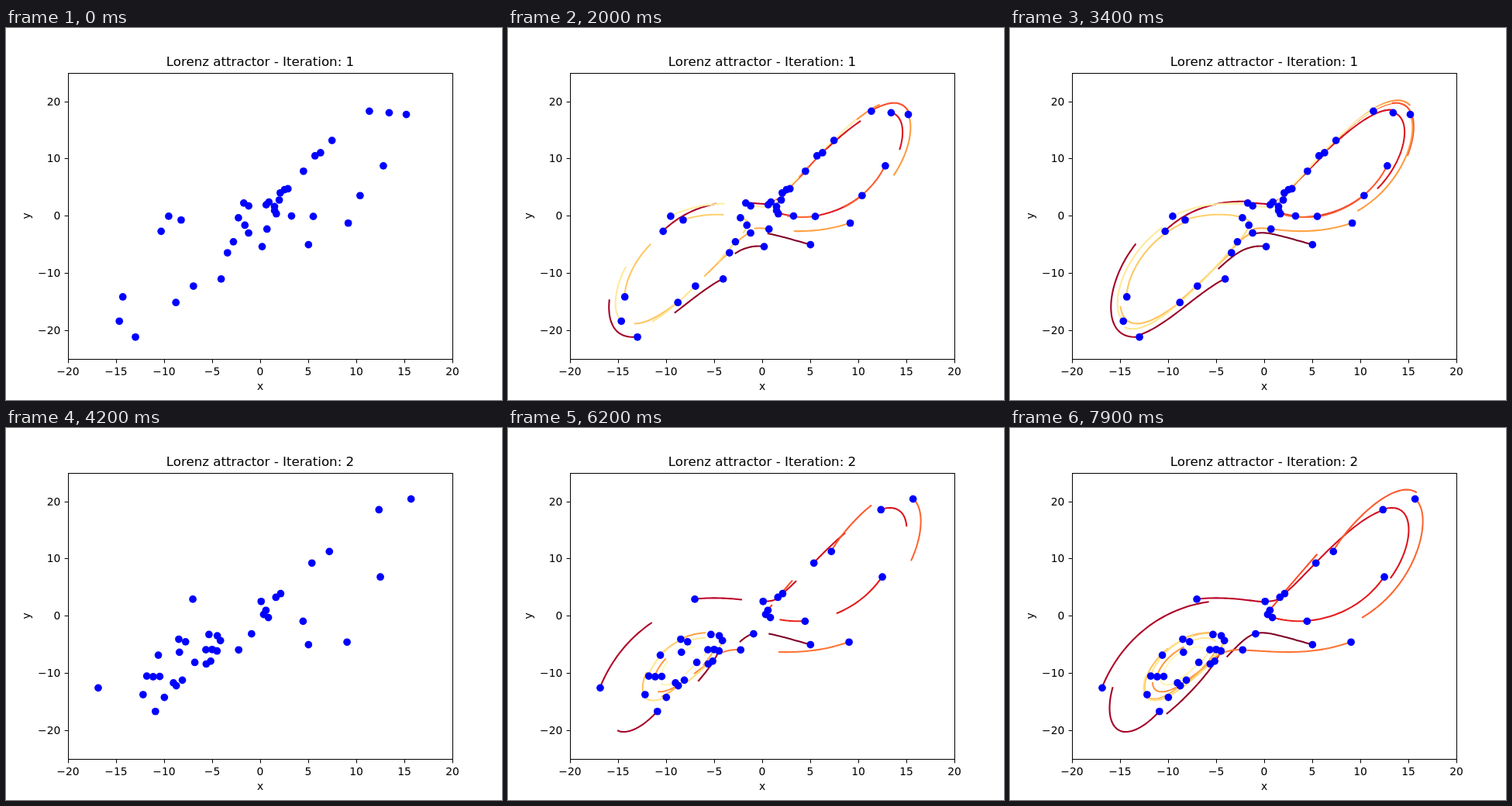
An HTML page with a canvas for the animation above (8000 ms loop, 640x480 px).

```html
<!DOCTYPE html>
<html lang="en">
<head>
<meta charset="utf-8">
<title>Lorenz attractor</title>
<style>
html, body { margin: 0; width: 100%; height: 100%; overflow: hidden; background: #fff; }
canvas { display: block; }
</style>
</head>
<body>
<canvas id="stage" width="640" height="480"></canvas>
<script>
const ctx = document.getElementById('stage').getContext('2d');
const COUNT = 40, SPAN = 0.125, STEPS = 36;
const FONT = '"DejaVu Sans", sans-serif';
const RAMP = ['800026', 'bd0026', 'e31a1c', 'fc4e2a', 'fd8d3c', 'feb24c', 'fed976', 'ffeda0', 'ffffcc']
  .map(hex => [0, 2, 4].map(i => parseInt(hex.slice(i, i + 2), 16)));

const px = x => 328 + x * 12.4;
const py = y => 242.4 - y * 7.392;

// Lorenz system, classical Runge-Kutta
const slope = ([x, y, z]) => [10 * (y - x), x * (28 - z) - y, x * y - 8 / 3 * z];
const shift = (u, k, h) => u.map((v, i) => v + h * k[i]);

function rk4(u, h) {
  const a = slope(u);
  const b = slope(shift(u, a, h / 2));
  const c = slope(shift(u, b, h / 2));
  const d = slope(shift(u, c, h));
  return u.map((v, i) => v + h / 6 * (a[i] + 2 * b[i] + 2 * c[i] + d[i]));
}

const coarse = u => rk4(u, SPAN);

function fine(u) {
  const path = [u];
  for (let i = 0; i < STEPS; i++) path.push(rk4(path[i], SPAN / STEPS));
  return path;
}

// Parareal: coarse guess, then one corrected set of points per pass
function correct(points, paths) {
  const next = [points[0]];
  for (let n = 0; n < COUNT - 1; n++) {
    const end = paths[n][STEPS], fresh = coarse(next[n]), old = coarse(points[n]);
    next.push(end.map((v, i) => v + fresh[i] - old[i]));
  }
  return next;
}

const guess = [[5, -5, 20]];
while (guess.length < COUNT) guess.push(coarse(guess[guess.length - 1]));
const guessPaths = guess.map(fine);
const better = correct(guess, guessPaths);
const betterPaths = better.map(fine);

function color(n) {
  const pos = n / COUNT * (RAMP.length - 1), i = Math.floor(pos);
  return `rgb(${RAMP[i].map((v, c) => Math.round(v + (RAMP[i + 1][c] - v) * (pos - i)))})`;
}

function text(str, x, y, size = 13.89, align = 'center') {
  ctx.font = `${size}px ${FONT}`;
  ctx.textAlign = align;
  ctx.fillText(str, x, y);
}

function dots(points, fill, r) {
  ctx.fillStyle = fill;
  for (const [x, y] of points) {
    ctx.beginPath();
    ctx.arc(px(x) + 0.3, py(y) + 0.3, r, 0, 7);
    ctx.fill();
  }
}

function lines(paths, steps) {
  if (steps < 1) return;
  ctx.lineWidth = 2.08;
  ctx.lineCap = 'square';
  ctx.lineJoin = 'round';
  paths.forEach((path, n) => {
    ctx.strokeStyle = color(n);
    ctx.beginPath();
    for (const [x, y] of path.slice(0, steps + 1)) ctx.lineTo(px(x), py(y));
    ctx.stroke();
  });
}

function axes(pass) {
  const label = v => String(v).replace('-', '\u2212');
  ctx.fillStyle = '#000';
  for (const y of [58, 427]) ctx.fillRect(80, y, 497, 1);
  for (const x of [80, 576]) ctx.fillRect(x, 58, 1, 370);
  for (let v = -20; v <= 20; v += 5) {
    ctx.fillRect(Math.round(px(v)), 428, 1, 4.4);
    text(label(v), px(v), 447.7);
  }
  for (let v = -20; v <= 20; v += 10) {
    const y = Math.round(py(v));
    ctx.fillRect(75.6, y, 4.4, 1);
    text(label(v), 70.3, y + 5.3, 13.89, 'right');
  }
  text('x', 328, 467);
  text('Lorenz attractor - Iteration: ' + pass, 328, 49.3, 16.67);
  ctx.save();
  ctx.translate(31, 242.4);
  ctx.rotate(-Math.PI / 2);
  text('y', 0, 0);
  ctx.restore();
}

function draw(now) {
  const t = now % 8000, second = t >= 4200;
  const tick = Math.floor((second ? t - 4300 : t) / 100);
  ctx.fillStyle = '#fff';
  ctx.fillRect(0, 0, 640, 480);
  lines(second ? betterPaths : guessPaths, Math.min(tick, STEPS));
  dots(second ? better : guess, '#00f', 4.86);
  if (!second && t >= 3700) dots(better, '#f00', 4.17);
  axes(second ? 2 : 1);
}

const start = performance.now();
function loop() {
  draw(performance.now() - start);
  requestAnimationFrame(loop);
}
loop();
</script>
</body>
</html>
```
